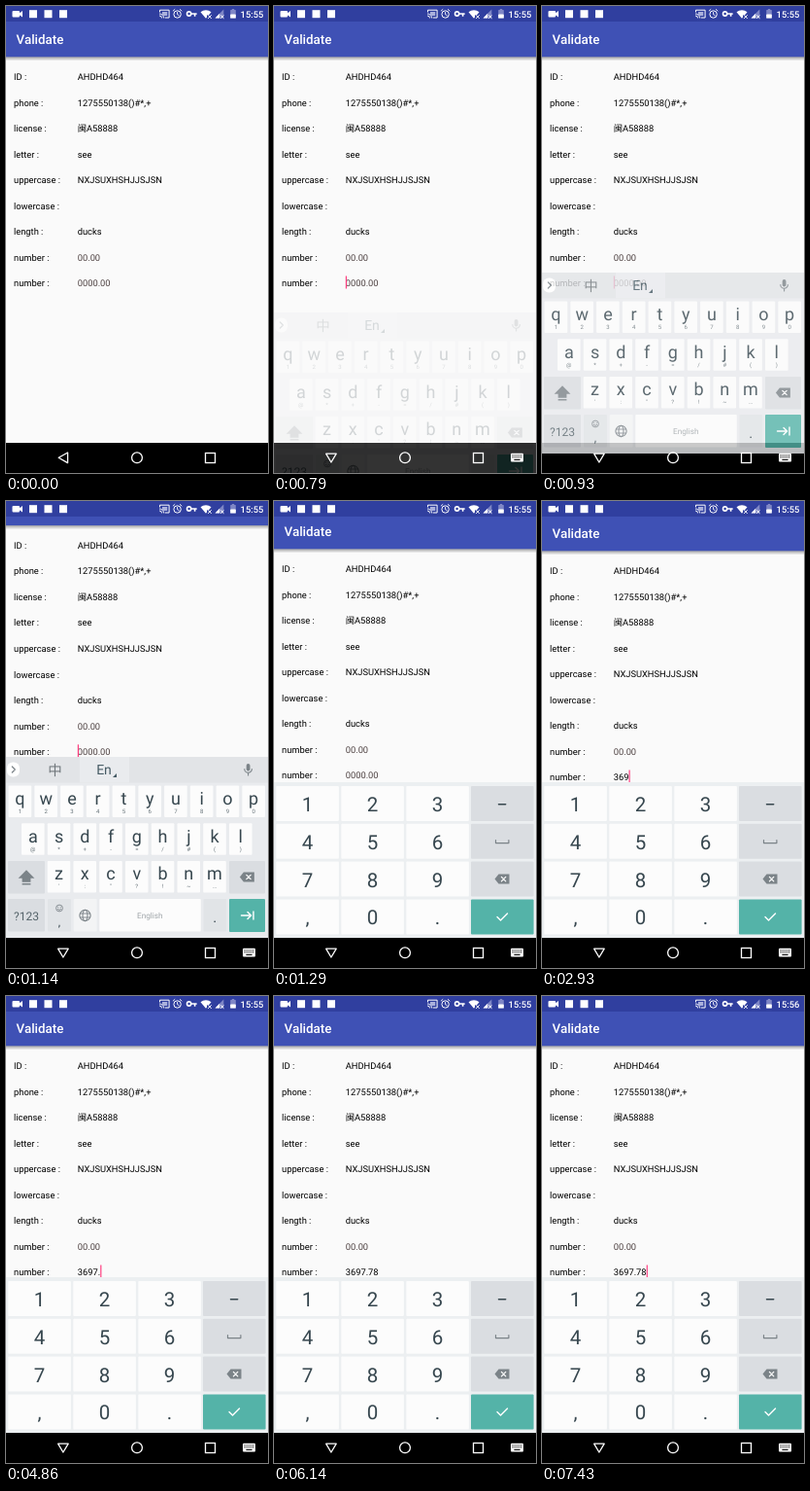
These frames come from a looping animation (270 px wide and 480 px high, 7570 ms). An HTML page:

```html
<!DOCTYPE html>
<html lang="en">
<head>
<meta charset="utf-8">
<title>Validate</title>
<style>
  html, body { margin: 0; width: 100%; height: 100%; overflow: hidden; background: #000; }
  svg { display: block; width: 270px; height: 480px; }
  text {
    font-family: Roboto, "Noto Sans CJK SC", "Noto Sans CJK", sans-serif;
    text-rendering: geometricPrecision;
    white-space: pre;
  }
  .line { fill: none; stroke-linecap: round; stroke-linejoin: round; }
</style>
</head>
<body>
<svg id="stage" viewBox="0 0 270 480">
  <defs>
    <linearGradient id="shade" x1="0" y1="0" x2="0" y2="1">
      <stop offset="0" stop-color="#000" stop-opacity=".36"/>
      <stop offset="1" stop-color="#000" stop-opacity="0"/>
    </linearGradient>
  </defs>
  <rect width="270" height="480" fill="#fafafa"/>
  <g id="page">
    <rect y="52" width="270" height="4.5" fill="url(#shade)"/>
    <rect y="-2" width="270" height="54.3" fill="#3f51b5"/>
  </g>
  <g id="status"><rect width="270" height="16" fill="#303f9f"/></g>
  <rect y="449" width="270" height="31"/>
  <g id="letters"></g>
  <g id="digits"></g>
  <g id="nav"></g>
</svg>
<script>
const NS = 'http://www.w3.org/2000/svg';
const $ = id => document.getElementById(id);
const LOOP = 7570;
const INK = '#37474f', GREY = '#7b8388', KEY = '#fcfcfc', DARK = '#dadde1', SOFT = '#e1e4e7', TEAL = '#54b3a8';

function add(parent, tag, attrs) {
  const el = document.createElementNS(NS, tag);
  for (const k in attrs) el.setAttribute(k, attrs[k]);
  parent.appendChild(el);
  return el;
}
function label(parent, str, x, y, size, fill, more = {}) {
  const el = add(parent, 'text', { x, y, 'font-size': size, fill, ...more });
  el.textContent = str;
  return el;
}
const mid = (parent, str, x, y, size, fill) =>
  label(parent, str, x, y, size, fill, { 'text-anchor': 'middle' });
const box = (parent, x, y, width, height, fill, rx = 0) =>
  add(parent, 'rect', { x, y, width, height, fill, rx });
const fillPath = (parent, d, fill) => add(parent, 'path', { d, fill, 'fill-rule': 'evenodd' });
const line = (parent, d, stroke, w = 1) =>
  add(parent, 'path', { d, stroke, 'stroke-width': w, class: 'line' });
const ring = (parent, cx, cy, r, stroke, w = 1) =>
  add(parent, 'circle', { cx, cy, r, stroke, 'stroke-width': w, fill: 'none' });

// Form
const page = $('page');
const START = 73.7, SIZE = 9.33, HINT = '#4e4242', TEXT = '#000';
label(page, 'Validate', 10.6, 39.2, 13.33, '#fff', { 'font-weight': 500 });
const rows = [
  ['ID', 'AHDHD464'], ['phone', '1275550138()#*,+'], ['license', '闽A58888'],
  ['letter', 'see'], ['uppercase', 'NXJSUXHSHJJSJSN'], ['lowercase', ''],
  ['length', 'ducks'], ['number', '00.00'], ['number', '0000.00']
];
let field;
rows.forEach(([name, value], i) => {
  const y = 76.1 + 26.53 * i;
  label(page, name + ' :', 8, y, SIZE, TEXT);
  field = label(page, value, START, y, SIZE, i > 6 ? HINT : TEXT);
});
const caret = box(page, START, 277.5, 1.2, 13, '#ff4081');

// Status bar
const bar = $('status'), W = '#fff';
box(bar, 6.5, 5, 7.5, 6.5, W, 1);
fillPath(bar, 'M13.5 7.4 17 5v6.5l-3.5-2.4z', W);
[24, 39.5, 55].forEach(x => box(bar, x, 4.2, 8, 8, W));
line(bar, 'M158.5 6V4.2h9.6v7.8h-4M158.5 8a4 4 0 0 1 4 4M158.5 10a2 2 0 0 1 2 2', W, 1);
box(bar, 161, 6, 5.2, 4, '#aab0dc');
ring(bar, 176.6, 8.5, 3.7, W);
line(bar, 'M176.6 6.5v2.2l1.6 1M172.2 5l1.7-1.5M181 5l-1.7-1.5', W, .9);
ring(bar, 188.6, 8, 2.1, W, 1.6);
line(bar, 'M191 8h5M194.6 8v2', W, 1.7);
fillPath(bar, 'M200.5 6.2a8.5 8.5 0 0 1 11 0L209 9.2h-2v2.3l-1 1.2z', W);
line(bar, 'M208.4 9.6l3 3M211.4 9.6l-3 3', W, 1);
fillPath(bar, 'M215.5 12.4l8.8-9v9z', '#8088c6');
fillPath(bar, 'M215.5 12.4l4.6-4.7v4.7z', W);
line(bar, 'M221.4 9.7l2.8 2.8M224.2 9.7l-2.8 2.8', W, 1);
box(bar, 231.2, 4, 5.6, 8.6, '#8088c6', .6);
box(bar, 232.8, 3, 2.4, 1.2, '#8088c6');
box(bar, 231.2, 8.6, 5.6, 4, W, .6);
const clock = label(bar, '15:55', 241.6, 11.6, SIZE, W, { 'font-weight': 500 });

// Shared key icon
function erase(g, x, y) {
  fillPath(g, `M${x - 7.5} ${y}l4-5h11v10h-11z`, GREY);
  line(g, `M${x - .6} ${y - 2.2}l4.4 4.4m0-4.4l-4.4 4.4`, '#fff', 1.2);
}

// Letter keyboard
const abc = $('letters');
box(abc, 0, 263, 270, 186, '#e9ebee');
box(abc, 0, 263, 270, 26.5, '#e2e4e7');
box(abc, 76, 263, 51, 26.5, '#e9ebee');
box(abc, 1, 268.5, 13, 15, '#fff', 6);
line(abc, 'M6.3 273l3 3-3 3', GREY, 1.2);
mid(abc, '中', 50.5, 282, 14.5, '#70777b');
mid(abc, 'En', 101, 281, 14, '#455a64');
fillPath(abc, 'M114 280v4h-4z', '#455a64');
box(abc, 247.7, 270, 3.8, 7.5, GREY, 1.9);
line(abc, 'M245.8 275.5a3.8 3.8 0 0 0 7.6 0M249.6 279.4v2.6', GREY, 1.1);

const PITCH = 26.75;
function keyRow(chars, signs, first, top) {
  [...chars].forEach((c, i) => {
    const x = first + PITCH * i;
    box(abc, x - 11.8, top, 23.6, 32.5, KEY, 1);
    mid(abc, c, x, top + 19.2, 18, INK);
    mid(abc, signs[i], x, top + 28.3, 6, '#68747a');
  });
}
keyRow('qwertyuiop', '1234567890', 14.4, 292.5);
keyRow('asdfghjkl', '@*+-=/#()', 27.8, 331.3);
keyRow('zxcvbnm', '\':"?!~…', 54.5, 370);
[[2, 370, 38], [230, 370, 37], [2, 409, 38]].forEach(([x, y, w]) => box(abc, x, y, w, 33.5, DARK, 1));
fillPath(abc, 'M21 379.3l8.4 8.4h-4v4h-8.8v-4h-4z', GREY);
box(abc, 16.6, 393, 8.8, 1.5, GREY);
erase(abc, 248.4, 386.5);
mid(abc, '?123', 21, 430.8, 12, '#55636a');
box(abc, 43, 409, 24, 33.5, SOFT, 1);
ring(abc, 55, 418.5, 3.4, GREY, .9);
line(abc, 'M53.3 419.5q1.7 2 3.4 0M53.7 417.4v.1M56.3 417.4v.1', GREY, .9);
mid(abc, ',', 55, 437, 12, INK);
box(abc, 69.7, 409, 24, 33.5, '#f3f4f5', 1);
ring(abc, 81.5, 426, 5.6, GREY, 1.1);
add(abc, 'ellipse', { cx: 81.5, cy: 426, rx: 2.5, ry: 5.6, fill: 'none', stroke: GREY });
line(abc, 'M76.4 424h10.2M76.4 428h10.2', GREY, .9);
box(abc, 96.3, 409, 104.5, 33.5, KEY, 1);
mid(abc, 'English', 148.3, 429, 8.2, '#a0a6aa');
box(abc, 203.5, 409, 23.8, 33.5, SOFT, 1);
mid(abc, '.', 215.3, 433, 15, INK);
box(abc, 230, 409, 37, 34, TEAL, 1);
line(abc, 'M242.5 426h9.5M249 422.4l3.6 3.6-3.6 3.6M255 422v8', '#fff', 1.4);

// Number keyboard
const num = $('digits');
box(num, 0, 289, 270, 160, '#eceff1');
['123', '456', '789', ',0.'].forEach((keys, r) => {
  const y = 293 + 38.8 * r;
  [...keys].forEach((c, i) => {
    box(num, 2.3 + 67 * i, y, 64.6, 36, KEY, 1);
    mid(num, c, 34.4 + 67 * i, y + 26, 20.5, INK);
  });
  box(num, 203, y, 64.6, 36, r < 3 ? DARK : TEAL, 1);
});
line(num, 'M231.5 311.8h7.2', INK, 1.5);
line(num, 'M228.5 348.6v3h13.4v-3', GREY, 1.2);
erase(num, 235, 388.6);
line(num, 'M230 427.6l3.5 3.5 7-7.2', '#fff', 1.4);

// Navigation bar
const nav = $('nav');
const back = line(nav, 'M63.6 459v10.6l-9.4-5.3z', W, 1.3);
const down = line(nav, 'M53.6 460.2h10.6l-5.3 8.8z', W, 1.3);
ring(nav, 135, 464.3, 5.4, W, 1.3);
add(nav, 'rect', { x: 205.5, y: 459.5, width: 10, height: 10, fill: 'none', stroke: W, 'stroke-width': 1.3 });
const switcher = add(nav, 'g', {});
box(switcher, 244, 459.8, 13, 8.6, W, 1);
for (let i = 0; i < 10; i++) box(switcher, 245.5 + 2.1 * (i % 5), 461.3 + 2 * Math.floor(i / 5), 1.1, 1.1, '#000');
box(switcher, 247.4, 465.8, 6.2, 1.1, '#000');

// Tables of [time, value]; each value holds until the next step
const pan = [[0, 0], [1000, -5], [1070, -18], [1140, -27.2], [1210, -14], [1290, -3], [1360, -1.5], [1430, -1]];
const rise = [[0, 90], [790, 52], [860, 27], [930, 11], [1000, 3], [1070, 0]];
const fade = [[0, 0], [790, .2], [860, .5], [930, .8], [1000, .96], [1070, 1], [1210, 0]];
const typed = [[0, ''], [2430, '3'], [2640, '36'], [2860, '369'], [3640, '3697'], [4860, '3697.'],
  [5210, '3697.7'], [5290, '3697.78']];
const blink = [[0, 0], [570, 1], [1210, 0], [1640, 1], [2210, 0], [2430, 1], [3430, 0], [3640, 1],
  [4140, 0], [4640, 1], [5790, 0], [6360, 1], [6860, 0], [7430, 1]];
const at = (table, t) => table.reduce((v, step) => t >= step[0] ? step[1] : v, table[0][1]);
const show = (el, on) => el.setAttribute('visibility', on ? 'visible' : 'hidden');

// Digit and point advances of Roboto, in em
const advance = s => [...s].reduce((w, c) => w + (c === '.' ? .263 : .5616), 0) * SIZE;

function draw(t) {
  const value = at(typed, t);
  page.setAttribute('transform', `translate(0 ${at(pan, t)})`);
  field.textContent = value || '0000.00';
  field.setAttribute('fill', value ? TEXT : HINT);
  caret.setAttribute('x', START + .1 + advance(value));
  show(caret, at(blink, t));
  abc.setAttribute('transform', `translate(0 ${at(rise, t)})`);
  abc.setAttribute('opacity', at(fade, t));
  show(num, t >= 1210);
  show(back, t < 790);
  show(down, t >= 790);
  show(switcher, t >= 790);
  clock.textContent = t < 7210 ? '15:55' : '15:56';
}

const begin = performance.now();
function tick() {
  draw((performance.now() - begin) % LOOP);
  requestAnimationFrame(tick);
}
tick();
</script>
</body>
</html>
```
